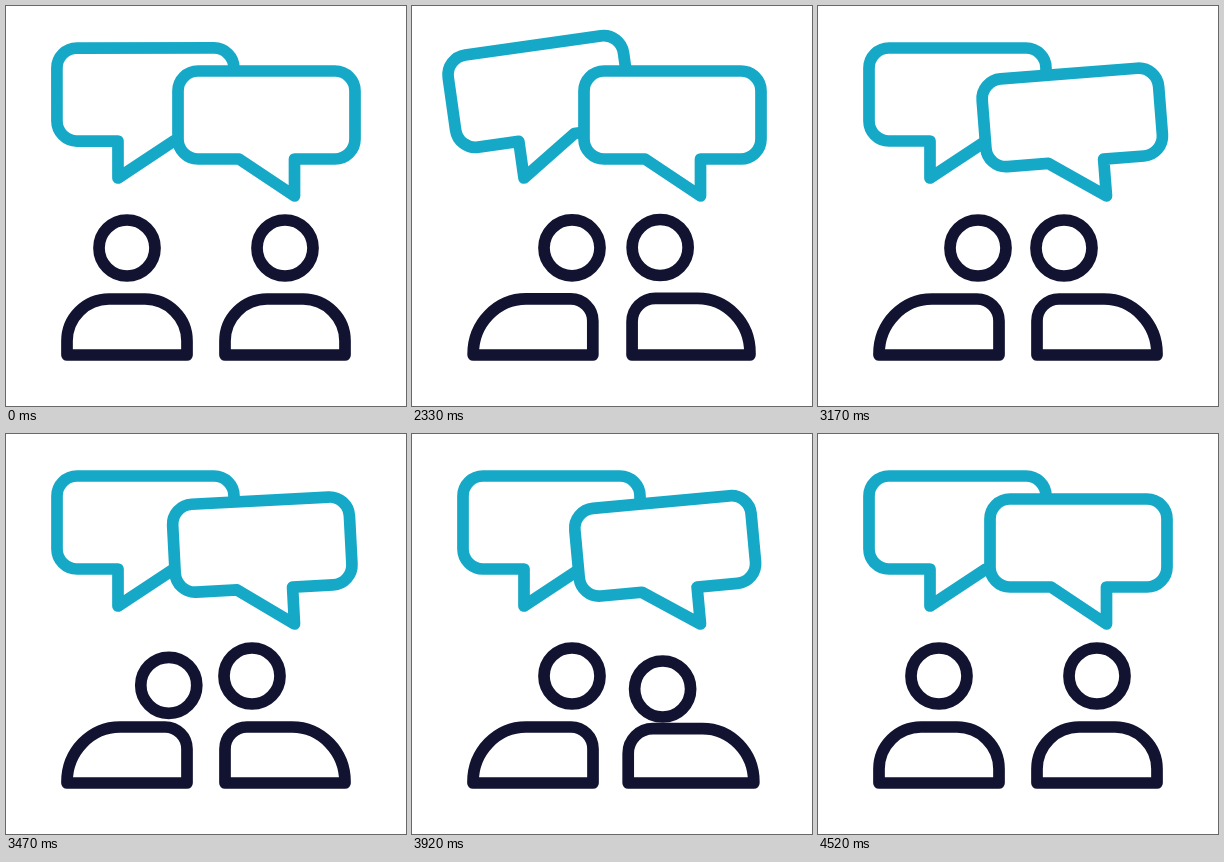
Animation, 400 px wide and 400 px high, one loop 4550 ms. Source, as an HTML page:

```html
<!DOCTYPE html>
<html lang="en">
<head>
<meta charset="utf-8">
<title>Conversation</title>
<style>
  html, body { margin: 0; width: 100%; height: 100%; overflow: hidden; background: #fff; }
  svg { display: block; width: 100vw; height: 100vh; }
  path, circle { stroke-width: 11.7; stroke-linejoin: round; }
  .bubble { fill: #fff; stroke: #16a9c7; }
  .person { fill: none; stroke: #121331; }
</style>
</head>
<body>
<svg viewBox="0 0 400 400">
  <path id="bubbleL" class="bubble" d="M71 42H208a20 20 0 0 1 20 20V115a20 20 0 0 1-20 20H168L112 172V135H71a20 20 0 0 1-20-20V62a20 20 0 0 1 20-20Z"/>
  <path id="bubbleR" class="bubble" d="M192 65H329a20 20 0 0 1 20 20V133a20 20 0 0 1-20 20H288.500V190L233 153H192a20 20 0 0 1-20-20V85a20 20 0 0 1 20-20Z"/>
  <g class="person">
    <path id="bodyL"/><circle id="headL" r="28"/>
  </g>
  <g class="person" transform="matrix(-1 0 0 1 400 0)">
    <path id="bodyR"/><circle id="headR" r="28"/>
  </g>
</svg>
<script>
const LOOP = 4550, REST = 2000, STEP = 30;
const $ = id => document.getElementById(id);
const mix = (a, b, u) => a + (b - a) * u;

// Eased value at k between [position, value] keys
function track(keys, k) {
  if (k <= keys[0][0]) return keys[0][1];
  for (let i = 1; i < keys.length; i++) {
    const [k0, a] = keys[i - 1], [k1, b] = keys[i];
    if (k < k1) {
      const u = (k - k0) / (k1 - k0);
      return mix(a, b, u * u * (3 - 2 * u));
    }
  }
  return keys[keys.length - 1][1];
}

const SWING = [[-.2, 0], [7, -20], [17, 14], [24, -8.5], [33, 4], [38, 0]];
const DIP = [[0, 0], [4.5, 13], [8, -1], [12, 0]];
const SQUASH = [[0, 0], [3, 1], [8, -.3], [12, 0]];
const NOD = [[23, 0], [31, 11], [39, 0], [47, 11], [55, 0]];

// Both people are drawn as the left one; the right one is mirrored
const people = [
  { side: 'L', out: 0, back: 70, turnedX: 160, nods: true },
  { side: 'R', out: 3.4, back: 59.5, turnedX: 154, nods: false }
];

function drawPerson({ side, out, back, turnedX, nods }, k) {
  const both = keys => track(keys, k - out) + track(keys, k - back);
  const turn = track([[out, 0], [out + 9, 1], [back + 2.5, 1], [back + 11, 0]], k);
  const nod = nods ? track(NOD, k) : 0;
  const squash = both(SQUASH);
  const outer = mix(42, 53, turn), outerY = mix(42, 55, turn), inner = mix(42, 22, turn);
  const halfW = 60 * (1 + .065 * squash), height = 56 * (1 - .04 * squash);
  const left = 121 - halfW, right = 121 + halfW, top = 349 - height;

  $('body' + side).setAttribute('d',
    `M${left} 349V${top + outerY}A${outer} ${outerY} 0 0 1 ${left + outer} ${top}` +
    `H${right - inner}A${inner} ${inner} 0 0 1 ${right} ${top + inner}V349Z`);
  $('head' + side).setAttribute('cx', mix(121, turnedX, turn) + nod * .3);
  $('head' + side).setAttribute('cy', 242 + both(DIP) + nod);
}

function draw(now) {
  const k = Math.max(0, Math.floor((now % LOOP - REST) / STEP));
  $('bubbleL').setAttribute('transform', `rotate(${track(SWING, k)} 112 172)`);
  $('bubbleR').setAttribute('transform', `rotate(${track(SWING, k - 37)} 288.500 190)`);
  people.forEach(person => drawPerson(person, k));
  requestAnimationFrame(draw);
}
draw(0);
</script>
</body>
</html>
```
